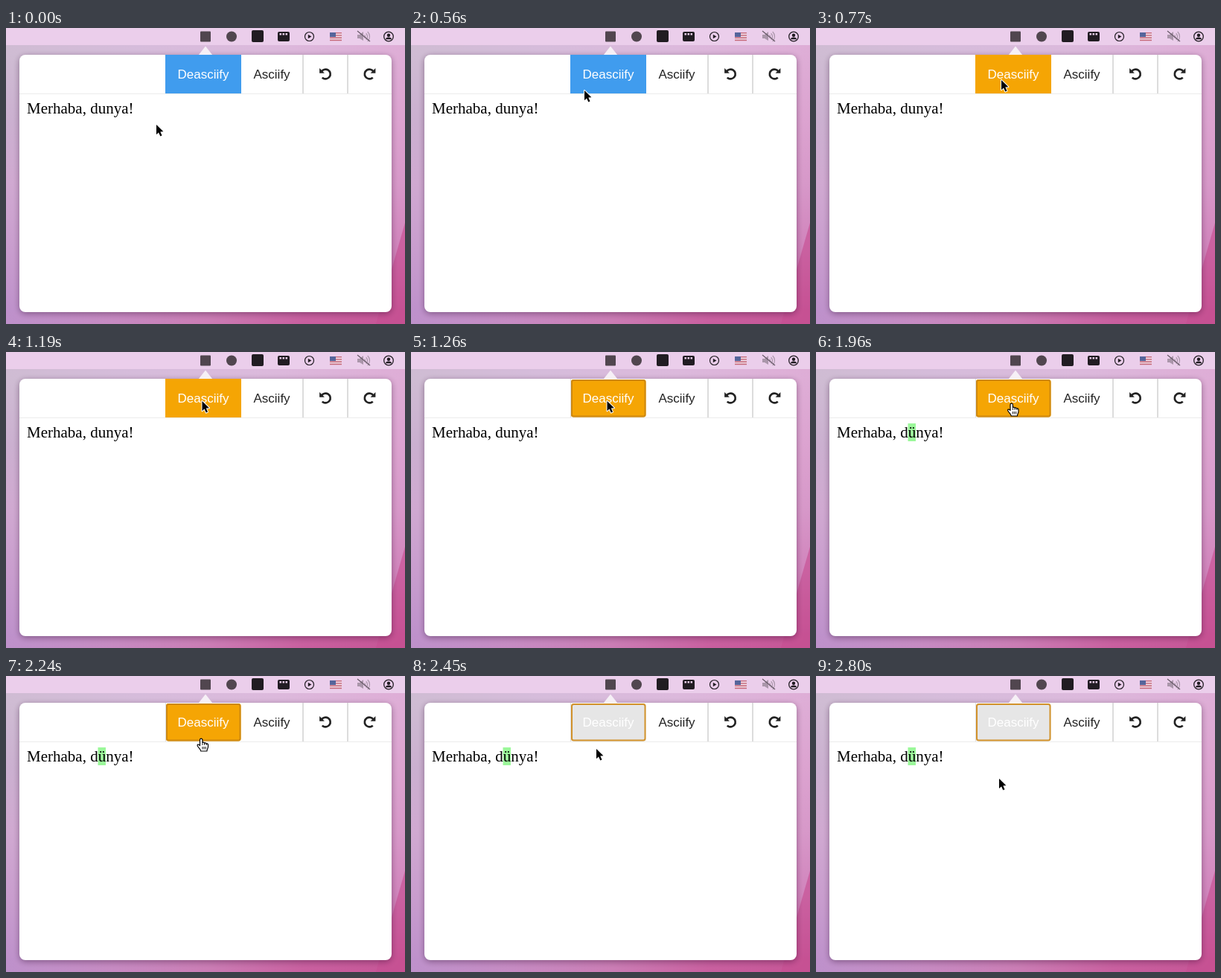
Recreate the animation shown at these times as an HTML page with a canvas. Size 536 px wide and 398 px high, loop 3360 ms.

```html
<!DOCTYPE html>
<html lang="en">
<head>
<meta charset="utf-8">
<title>Deasciify</title>
<style>
html, body { margin: 0; width: 100%; height: 100%; overflow: hidden; background: #cfa6d0; }
canvas { display: block; width: 536px; height: 398px; }
</style>
</head>
<body>
<canvas id="stage"></canvas>
<script>
const W = 536, H = 398, LOOP = 3360, STEP = 70;
const HOVER = 630, PRESS = 1260, CLICK = 1330, LEAVE = 2310;
const INK = '#211c22', BAR = '#ebceeb';
const canvas = document.getElementById('stage');
const c = canvas.getContext('2d');
const dpr = window.devicePixelRatio || 1;
canvas.width = W * dpr;
canvas.height = H * dpr;

// Pointer path: time, x, y
const path = [
  [280, 202, 130], [350, 204, 127], [420, 212, 116], [560, 233, 84],
  [700, 246, 73], [770, 249, 70], [840, 252, 69], [980, 263.5, 66],
  [1260, 263.5, 66], [1330, 263, 67], [1890, 263, 67], [2030, 263, 71],
  [2240, 262.5, 84], [2310, 258, 89], [2450, 249, 98], [2660, 247, 125],
  [2800, 246, 138]
];

const arrow = new Path2D('M0 0V13.2L3 10.5L5.3 15.6L7.5 14.6L5.3 9.6L9.4 9.3Z');
const hand = new Path2D('M-2 9.5V2C-2 -.4 1.4 -.4 1.4 2V6C2 4.8 4 5 4.2 6.6' +
  'C4.9 5.5 6.7 5.9 6.8 7.3C7.7 6.5 9 7 9 8.5V11C9 13 7.6 14 7.4 17H-.8' +
  'C-.9 14.8 -3.6 13 -5.2 10C-6 8 -3.8 7.3 -2 9.5Z');

function pointAt(t) {
  if (t <= path[0][0]) return path[0].slice(1);
  for (let i = 1; i < path.length; i++) {
    const [t0, x0, y0] = path[i - 1], [t1, x1, y1] = path[i];
    if (t <= t1) {
      const k = (t - t0) / (t1 - t0);
      return [x0 + (x1 - x0) * k, y0 + (y1 - y0) * k];
    }
  }
  return path[path.length - 1].slice(1);
}

function rect(x, y, w, h, fill) {
  c.fillStyle = fill;
  c.fillRect(x, y, w, h);
}

function round(x, y, w, h, r, fill) {
  c.beginPath();
  c.roundRect(x, y, w, h, r);
  c.fillStyle = fill;
  c.fill();
}

function disc(x, y, r, fill) {
  c.beginPath();
  c.arc(x, y, r, 0, 7);
  c.fillStyle = fill;
  c.fill();
}

function ring(x, y, r, width) {
  c.beginPath();
  c.arc(x, y, r, 0, 7);
  c.lineWidth = width;
  c.strokeStyle = INK;
  c.stroke();
}

function poly(points, fill) {
  c.beginPath();
  points.forEach(([x, y]) => c.lineTo(x, y));
  c.closePath();
  c.fillStyle = fill;
  c.fill();
}

function text(s, x, y, font, fill) {
  c.font = font;
  c.fillStyle = fill;
  c.fillText(s, x, y);
}

function blend(x, y, w, h, down, colors) {
  const g = c.createLinearGradient(x, y, down ? x : x + w, down ? y + h : y);
  colors.forEach((col, i) => g.addColorStop(i / (colors.length - 1), col));
  rect(x, y, w, h, g);
}

function wallpaper() {
  blend(0, 20, W, 40, false, ['#cfbcd3', '#d6bcdb', '#dcb9dc', '#deadd6']);
  blend(0, 370, W, 28, false, ['#be91cb', '#c68bc3', '#cb7db5', '#c95f9f', '#c65596']);
  blend(0, 36, 26, 346, true, ['#cfbcd3', '#cbb0d0', '#d0a9d1', '#c99dce', '#be91cb']);
  blend(510, 36, 26, 346, true, ['#deadd6', '#dca3d0', '#d798c9', '#d184bc', '#c65596']);
  poly([[W, 262], [W, H], [497, H]], 'rgba(198,79,146,.65)');
  rect(0, 0, W, 23, BAR);
}

function menuBar() {
  round(261, 4.5, 14, 14, 1, '#51464f');
  disc(303, 11.5, 7, '#51464f');
  round(330, 3, 16, 16, 2, INK);

  round(365, 5, 16, 13, 2, INK);
  for (let i = 0; i < 3; i++) rect(367.5 + i * 4, 7, 2.5, 2.5, BAR);

  ring(407.5, 11.5, 6, 1.2);
  poly([[405.8, 8.8], [405.8, 14.2], [410.4, 11.5]], INK);

  for (let i = 0; i < 7; i++) rect(435, 6 + i * 1.6, 16, 1.6, i % 2 ? '#f1dde8' : '#c66b7b');
  rect(435, 6, 8, 6, '#55659b');

  const grey = '#aa96aa';
  poly([[472, 9], [475, 9], [480, 5], [480, 17], [475, 14], [472, 14]], grey);
  c.strokeStyle = grey;
  c.lineWidth = 1.2;
  for (const r of [3, 6, 9]) {
    c.beginPath();
    c.arc(479.5, 11.5, r, -0.8, 0.8);
    c.stroke();
  }
  c.beginPath();
  c.moveTo(472, 4);
  c.lineTo(489, 18);
  c.strokeStyle = '#675967';
  c.stroke();

  ring(514, 11.5, 6.3, 1.3);
  disc(514, 9.7, 2.2, INK);
  c.beginPath();
  c.ellipse(514, 15.2, 4, 2.6, 0, Math.PI, 0);
  c.fill();
}

function turnIcon(x, flip) {
  c.save();
  c.translate(x, 62);
  c.scale(flip, 1);
  c.beginPath();
  c.arc(0.3, 0, 6.4, -2.55, 2.35);
  c.lineWidth = 2.6;
  c.strokeStyle = '#222';
  c.stroke();
  poly([[-7.9, -8], [-7.9, -1.2], [-1.1, -1.2]], '#222');
  c.restore();
}

function popover() {
  c.save();
  c.shadowColor = 'rgba(40,10,40,.42)';
  c.shadowBlur = 9 * dpr;
  c.shadowOffsetY = 2 * dpr;
  round(18, 36, 500, 346, 8, '#fff');
  c.restore();
  poly([[268, 24.5], [277.5, 36.5], [258.5, 36.5]], '#f6f0f6');
  rect(18, 88, 500, 1, '#ececec');
  for (const x of [398, 458]) rect(x, 36, 2, 52, '#dcdcdc');
}

function mainButton(t) {
  const fill = t < HOVER ? '#409cee' : t < LEAVE ? '#f5a504' : '#e6e6e6';
  if (t < PRESS) {
    rect(214, 36, 102, 52, fill);
  } else {
    rect(214, 36, 1, 52, '#dedede');
    round(215, 37, 100.5, 50.5, 3, fill);
    c.beginPath();
    c.roundRect(216, 38, 98.5, 48.5, 2.5);
    c.lineWidth = 2;
    c.strokeStyle = t < LEAVE ? '#cd8811' : '#d2922b';
    c.stroke();
  }
  text('Deasciify', 230.5, 68, '17px "Liberation Sans", Arial, sans-serif', '#fff');
}

function pointer(t) {
  const [x, y] = pointAt(t);
  const pointing = t >= CLICK && t < LEAVE;
  const shape = pointing ? hand : arrow;
  c.save();
  c.translate(x, y);
  c.lineJoin = 'round';
  c.lineWidth = pointing ? 1.2 : 2;
  c.strokeStyle = pointing ? '#000' : '#fff';
  c.fillStyle = pointing ? '#fff' : '#000';
  if (pointing) c.fill(shape);
  c.stroke(shape);
  if (!pointing) c.fill(shape);
  if (pointing) {
    c.lineWidth = 0.9;
    c.beginPath();
    for (const px of [1.4, 4.2, 6.8]) {
      c.moveTo(px, 6.5);
      c.lineTo(px, 9);
    }
    for (const px of [1.5, 3.6, 5.7]) {
      c.moveTo(px, 11);
      c.lineTo(px, 14.5);
    }
    c.stroke();
  }
  c.restore();
}

function draw(now) {
  const t = Math.floor((now % LOOP) / STEP) * STEP;
  c.setTransform(dpr, 0, 0, dpr, 0, 0);
  wallpaper();
  menuBar();
  popover();
  mainButton(t);
  text('Asciify', 332.5, 68, '17px "Liberation Sans", Arial, sans-serif', '#222');
  turnIcon(429, 1);
  turnIcon(488.5, -1);
  const done = t >= CLICK;
  if (done) rect(123.5, 96, 10.5, 24, '#9bf89a');
  text(done ? 'Merhaba, dünya!' : 'Merhaba, dunya!', 28, 115, '21px "Liberation Serif", Times, serif', '#000');
  pointer(t);
}

const start = performance.now();
function tick() {
  draw(performance.now() - start);
  requestAnimationFrame(tick);
}
tick();
</script>
</body>
</html>
```
